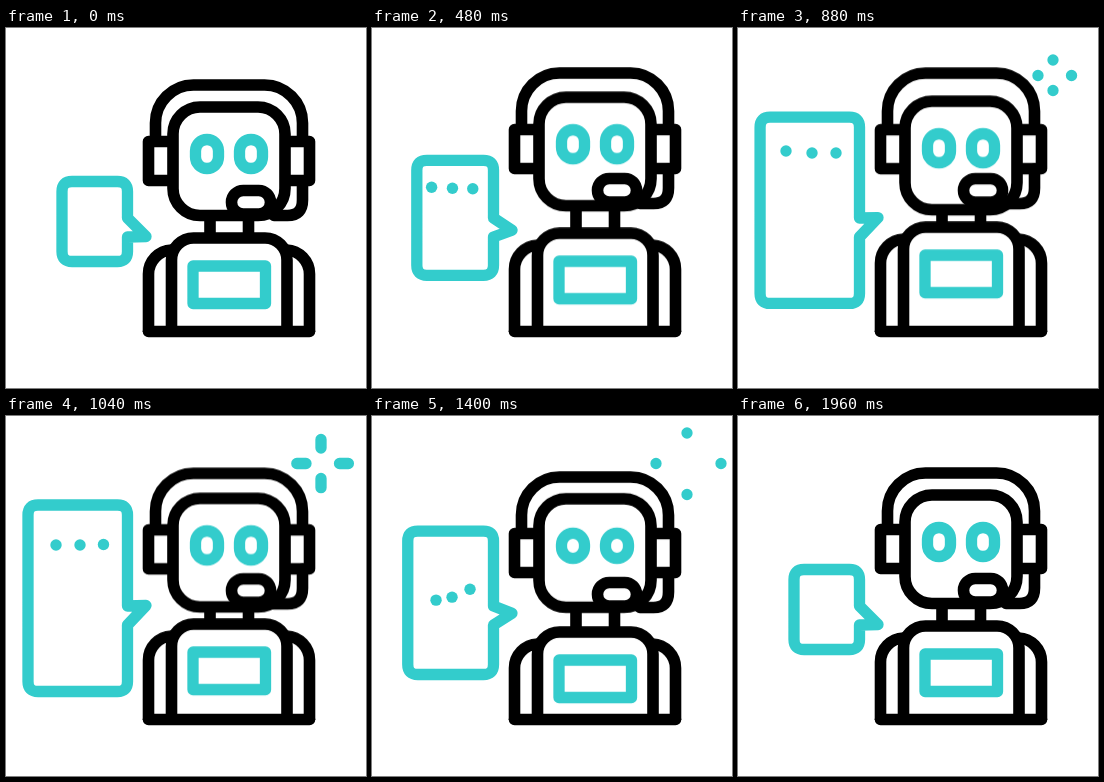
An HTML page that plays this animation: 360 px wide and 360 px high, repeating every 3000 ms.

```html
<!DOCTYPE html>
<html lang="en">
<head>
<meta charset="utf-8">
<title>Chatting robot</title>
<style>
  html, body { margin: 0; width: 100%; height: 100%; overflow: hidden; background: #fff; }
  svg { display: block; width: 100%; height: 100%; }
  .ink, .teal { fill: none; stroke: #000; stroke-width: 11.6; stroke-linejoin: round; stroke-linecap: round; }
  .teal { stroke: #3cc; stroke-width: 11.3; }
  .solid { fill: #fff; }

  .head, .headset, .body, .eye, .bubble, .sparks, .dots circle {
    animation: 3s cubic-bezier(.3333, 0, .6667, 1) infinite;
  }
  .head { animation-name: head; }
  .headset { animation-name: headset; }
  .body { animation-name: body; }
  .eye { animation-name: blink; }
  .bubble { animation-name: bubble; }
  .sparks { animation-name: sparks, show; animation-timing-function: linear, step-end; }
  .dots circle { fill: #3cc; animation-name: travel, pop; }

  @keyframes head {
    0%, 8% { transform: translateY(0); }
    21.33% { transform: translateY(-15px); }
    39.33% { transform: translateY(7px); }
    55%, 100% { transform: translateY(0); }
  }
  @keyframes headset {
    0%, 8% { transform: translateY(0); }
    22.67% { transform: translateY(-21px); }
    40% { transform: translateY(6.5px); }
    56%, 100% { transform: translateY(0); }
  }
  @keyframes body {
    0%, 10.67% { transform: translateY(0); }
    24.67% { transform: translateY(-14.5px); }
    42.67% { transform: translateY(7px); }
    60%, 100% { transform: translateY(0); }
  }
  @keyframes blink {
    0%, 43.33% { y: 111.5px; height: 29px; }
    49.33%, 54.67% { y: 114.5px; height: 23px; }
    65.33%, 100% { y: 111.5px; height: 29px; }
  }
  @keyframes bubble {
    0%, 7.33%, 60%, 100% {
      d: path("M66 153.5H111.5Q121.5 153.5 121.5 163.5V190L140 208.5L121.5 209V223.5Q121.5 233.5 111.5 233.5H66Q56 233.5 56 223.5V163.5Q56 153.5 66 153.5Z");
    }
    30%, 37.33% {
      d: path("M32 89H111.5Q121.5 89 121.5 99V190L140 189.5L121.5 209V265.5Q121.5 275.5 111.5 275.5H32Q22 275.5 22 265.5V99Q22 89 32 89Z");
      animation-timing-function: cubic-bezier(.33, 0, .6, 1);
    }
  }
  @keyframes travel {
    0%, 8.67% { translate: var(--rest); }
    22.67% { translate: var(--top); }
    29.33% { translate: var(--hover); }
    40% { translate: var(--dip); animation-timing-function: cubic-bezier(.4, .1, .8, .8); }
    46.67% { translate: var(--drop); animation-timing-function: ease-out; }
    54.67%, 100% { translate: var(--land); }
  }
  @keyframes pop {
    0%, 8% { r: 0px; }
    13%, 55% { r: 5.7px; }
    61%, 100% { r: 0px; }
  }
  @keyframes sparks {
    0%, 29.33% { d: path("M315 32V32M315 62.5V62.5M300 47.5H300M333.5 47.5H333.5"); }
    38.67%, 40% { d: path("M315 32V17M315 62.5V78.5M300 47.5H284M333.5 47.5H349"); }
    46.67%, 100% { d: path("M315 17V17M315 78.5V78.5M284 47.5H284M349 47.5H349"); }
  }
  @keyframes show {
    0% { opacity: 0; }
    28% { opacity: 1; }
    48%, 100% { opacity: 0; }
  }
</style>
</head>
<body>
<svg viewBox="0 0 360 360">
  <clipPath id="floor"><path d="M0 0H360V304H0Z"/></clipPath>

  <path class="ink" d="M204 150V245M242.5 150V245"/>

  <g clip-path="url(#floor)">
    <g class="body">
      <path class="ink" d="M142.5 340V246a24 24 0 0 1 23-24M303.5 340V246a24 24 0 0 0-23-24"/>
      <path class="ink solid" d="M165.5 340V232a22 22 0 0 1 22-22H259a22 22 0 0 1 22 22V340"/>
      <rect class="teal" x="187" y="238" width="72.5" height="37.5"/>
    </g>
  </g>
  <path class="ink" d="M142.5 303.5H303.5"/>

  <g class="headset">
    <path class="ink" d="M149.5 113V95a38 38 0 0 1 38-38H258.5a38 38 0 0 1 38 38V113"/>
    <path class="ink" d="M167 113.5H142.5V152.5H167M279 113.5H303.5V152.5H279"/>
  </g>

  <g class="head">
    <rect class="ink solid" x="167" y="79" width="112" height="108.5" rx="27"/>
    <rect class="teal eye" x="189.5" y="111.5" width="23" height="29" rx="11.5"/>
    <rect class="teal eye" x="233.5" y="111.5" width="23" height="29" rx="11.5"/>
  </g>

  <g class="headset">
    <path class="ink" d="M296.5 153V172q0 15.5-15 15.5H268"/>
    <rect class="ink solid" x="225.5" y="162.5" width="39" height="23.5" rx="11.75"/>
  </g>

  <path class="teal bubble" d="M66 153.5"/>
  <g class="dots">
    <circle style="--rest:72px 205px; --top:49px 120px; --hover:48px 123px; --dip:52px 135px; --drop:64px 184px; --land:70.5px 208px"/>
    <circle style="--rest:88px 205px; --top:74px 122px; --hover:74px 125px; --dip:74px 133px; --drop:80px 181px; --land:86.5px 208px"/>
    <circle style="--rest:104px 205px; --top:98px 123px; --hover:98px 125px; --dip:97px 132px; --drop:98px 173px; --land:102px 206px"/>
  </g>
  <path class="teal sparks" d="M315 32V32"/>
</svg>
</body>
</html>
```
